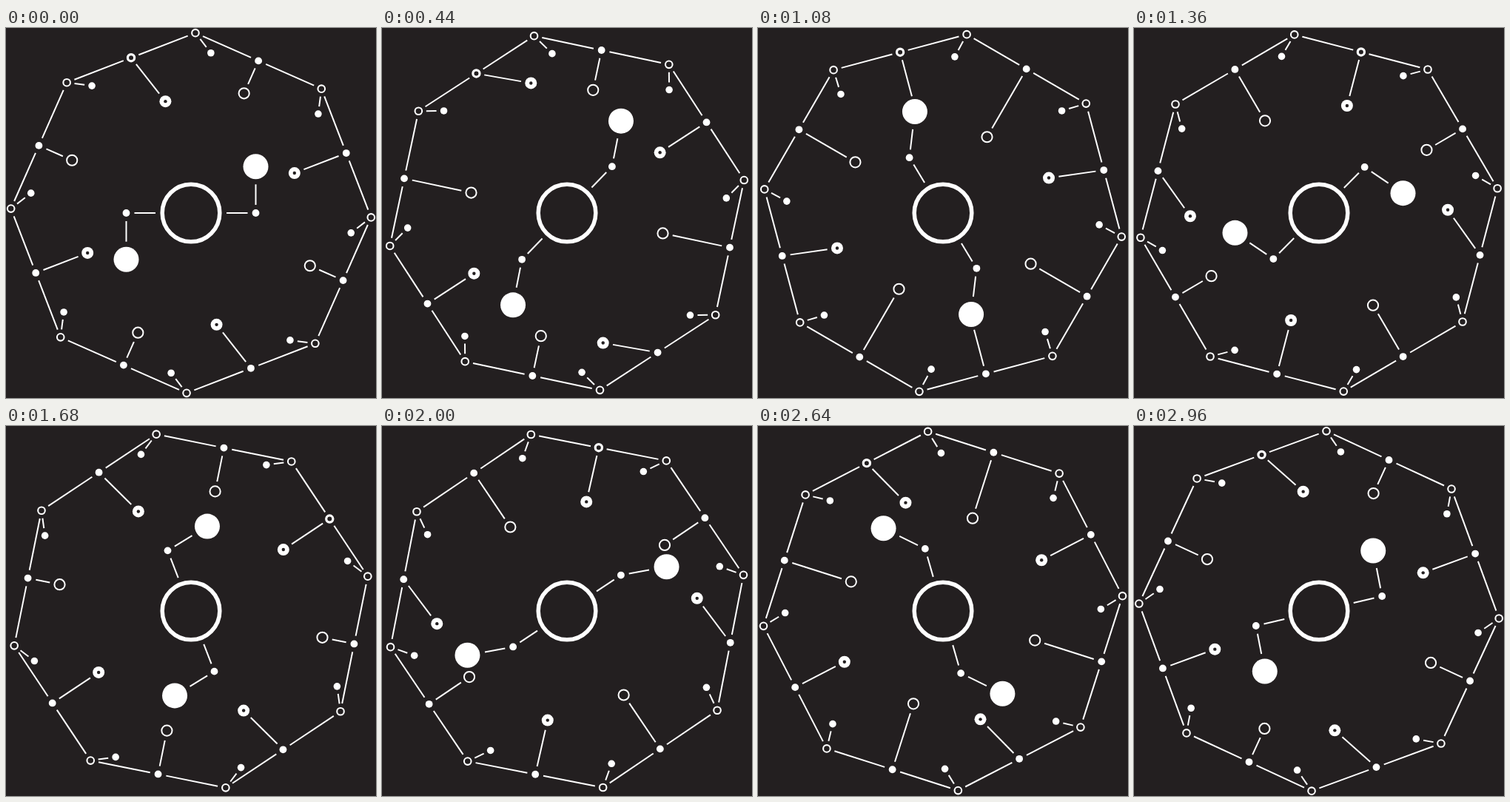
Animation, 500 px wide and 500 px high, one loop 3000 ms. Source, as an HTML page with a canvas:

```html
<!DOCTYPE html>
<html lang="en">
<head>
<meta charset="utf-8">
<title>Orbiting linkage</title>
<style>
  html, body { margin: 0; width: 100%; height: 100%; overflow: hidden; background: #231f20; }
  canvas { display: block; }
</style>
</head>
<body>
<canvas id="stage" width="500" height="500"></canvas>
<script>
const ctx = document.getElementById('stage').getContext('2d');
const DARK = '#231f20', WHITE = '#fff';
const STEP = 40, STEPS = 75, HALF = STEPS / 2;
const RIM = 243.4, MID = RIM * Math.cos(Math.PI / 8);

// Smooth cyclic curve through [step, value] keys, without overshoot.
// Each new period multiplies the value by sign and adds gain.
function track(keys, period, sign = 1, gain = 0) {
  const n = keys.length;
  const key = i => {
    const turn = Math.floor(i / n), [x, y] = keys[i - turn * n];
    return [x + turn * period, (turn % 2 ? sign : 1) * y + turn * gain];
  };
  const slope = i => {
    const [x0, y0] = key(i), [x1, y1] = key(i + 1);
    return (y1 - y0) / (x1 - x0);
  };
  const tangent = i => {
    const a = slope(i - 1), b = slope(i);
    if (a * b <= 0) return 0;
    const h0 = key(i)[0] - key(i - 1)[0], h1 = key(i + 1)[0] - key(i)[0];
    const w0 = 2 * h1 + h0, w1 = h1 + 2 * h0;
    return (w0 + w1) / (w0 / a + w1 / b);
  };
  return k => {
    let i = Math.floor(k / period) * n;
    while (key(i + 1)[0] <= k) i++;
    const [x0, y0] = key(i), [x1, y1] = key(i + 1);
    const h = x1 - x0, u = (k - x0) / h, v = 1 - u;
    return y0 * v * v * (1 + 2 * u) + y1 * u * u * (3 - 2 * u)
      + h * u * v * (v * tangent(i) - u * tangent(i + 1));
  };
}

const spin = track([[0, -21.1], [11, -33.03], [19, -33.12], [34, 14.65],
  [42, 56.4], [58, -34.45], [74, -20.15]], STEPS);
const crank = track([[0, 0], [4.5, 68.9], [11, 134.1], [19, 188.55],
  [20.5, 192.6], [34, 314.8], [36.5, 346.8]], HALF, 1, 360);
const elbow = track([[0, -90], [4.5, -79.6], [11, -33], [19, 9.55],
  [20.5, 10.3], [34, 79.4], [36.5, 87.8]], HALF, -1);
const sway = track([[0, -39.1], [4.5, -48.3], [11, -35], [19, -12],
  [20.5, -6.6], [34, 38.2], [36.5, 37]], HALF, -1);
const swing = track([[0, -17.1], [4.5, 11.7], [11, -47], [19, 5.7], [20.5, 0],
  [34, 0], [48.5, 0], [56.5, 21.7], [58, 22.6], [71.5, -39.9], [74, -28.3]], STEPS);
const reachA = track([[0, 48], [4.5, 43.8], [11, 55], [19, 140],
  [20.5, 140.3], [34, 56.3], [36.5, 49.7]], HALF);
const reachB = track([[0, 49], [1.5, 43], [4.5, 60], [11, 92.5], [19, 43],
  [20.5, 43.3], [29, 95], [34, 80.4], [36.5, 58.4]], HALF);

function polar([x, y], r, deg) {
  const a = deg * Math.PI / 180;
  return [x + r * Math.cos(a), y + r * Math.sin(a)];
}

function link(p, q, gapP, gapQ) {
  const dx = q[0] - p[0], dy = q[1] - p[1], d = Math.hypot(dx, dy);
  if (d <= gapP + gapQ) return;
  ctx.lineWidth = 2;
  ctx.beginPath();
  ctx.moveTo(p[0] + dx * gapP / d, p[1] + dy * gapP / d);
  ctx.lineTo(q[0] - dx * gapQ / d, q[1] - dy * gapQ / d);
  ctx.stroke();
}

function dot([x, y], r, color = WHITE) {
  ctx.fillStyle = color;
  ctx.beginPath();
  ctx.arc(x, y, r, 0, 2 * Math.PI);
  ctx.fill();
}

function ring([x, y], r, width) {
  ctx.lineWidth = width;
  ctx.beginPath();
  ctx.arc(x, y, r, 0, 2 * Math.PI);
  ctx.stroke();
}

function drawRim(k) {
  const center = [250, 250], turn = spin(k) - 90;
  const lean = [swing(k), 0, -swing(k + HALF), 0];
  const reach = [75, reachA(k), 75, reachB(k)];
  for (let i = 0; i < 8; i++) {
    const a = turn + 45 * i, kind = i % 4;
    const mid = polar(center, MID, a);
    const corner = polar(center, RIM, a + 22.5);
    const next = polar(center, MID, a + 45);
    link(mid, corner, 11, 11);
    link(corner, next, 11, 11);

    const bob = polar(corner, 34.2, a + 202.5 + sway(k));
    link(corner, bob, 10.5, 10);
    ring(corner, 4.8, 2.1);
    dot(bob, 4.8);

    const tip = polar(mid, reach[kind], a + 180 + lean[kind]);
    link(mid, tip, 11, 13.5);
    if (i) dot(mid, 4.9);
    else ring(mid, 4.6, 3.2);
    if (kind % 2) {
      ring(tip, 7.1, 2);
    } else {
      dot(tip, 8);
      dot(tip, 2.2, DARK);
    }
  }
}

function drawHub(k) {
  const center = [250, 250];
  ring(center, 38.8, 5.5);
  for (const side of [0, 180]) {
    const a = crank(k) + side;
    const joint = polar(center, 87.5, a);
    const ball = polar(joint, 62.7, a + elbow(k));
    link(center, joint, 48, 11);
    link(joint, ball, 11, 24);
    dot(joint, 4.9);
    dot(ball, 17);
  }
}

function draw(now) {
  const k = Math.floor(now / STEP) % STEPS;
  ctx.fillStyle = DARK;
  ctx.fillRect(0, 0, 500, 500);
  ctx.strokeStyle = WHITE;
  drawRim(k);
  drawHub(k);
}

let start = null;
function tick(now) {
  if (start === null) start = now;
  draw(now - start);
  requestAnimationFrame(tick);
}
draw(0);
requestAnimationFrame(tick);
</script>
</body>
</html>
```
